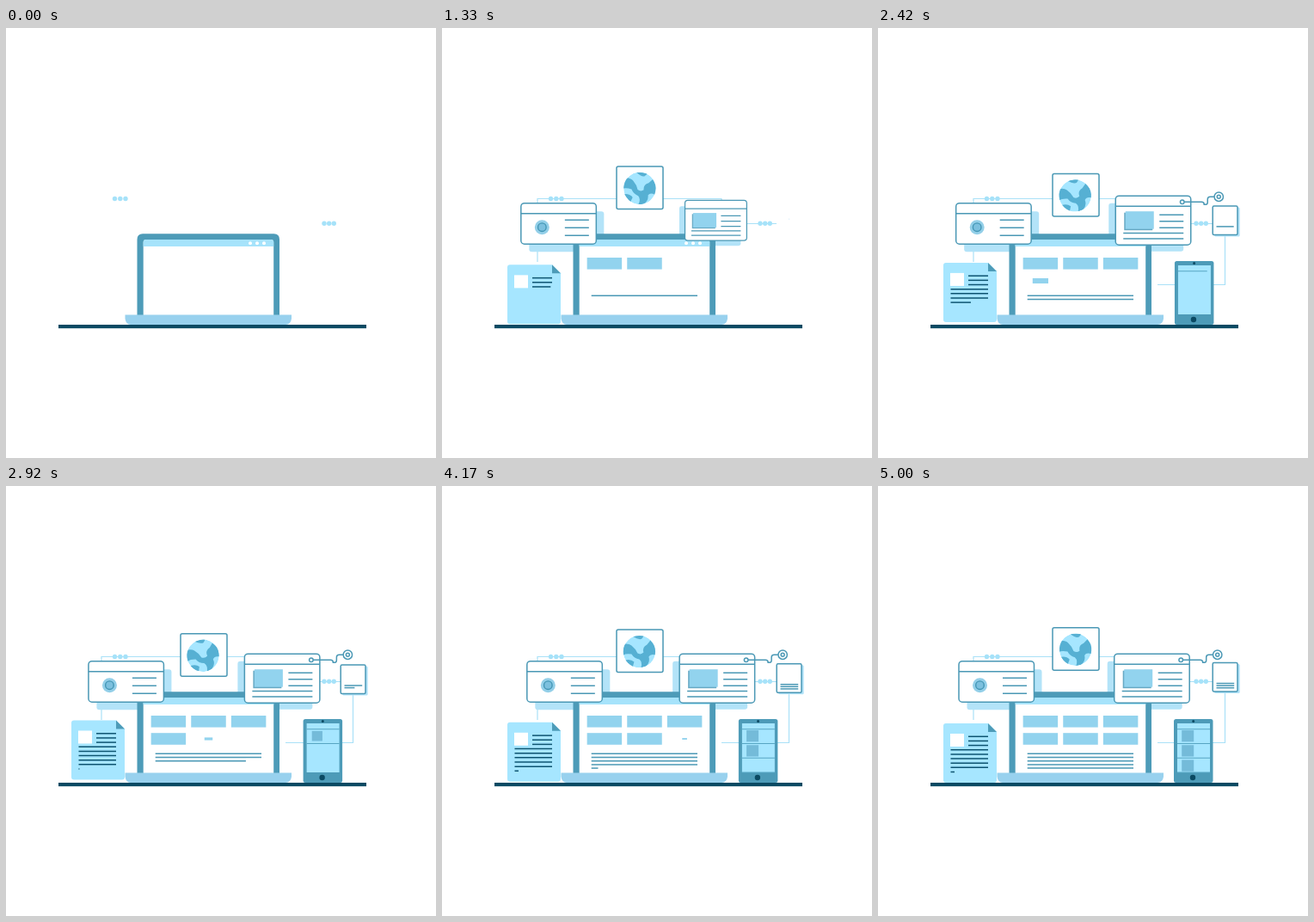
Recreate the animation shown at these times as an HTML page. Size 500x500 px, loop 5.08 s.

```html
<!DOCTYPE html>
<html lang="en">
<head>
<meta charset="utf-8">
<title>Connected devices</title>
<style>
  html, body { margin: 0; width: 100%; height: 100%; overflow: hidden; background: #fff; }
  svg { display: block; width: 100%; height: 100%; }
  .wire { fill: none; stroke: #a9e1f7; stroke-width: 1.2; }
  .card { fill: #fff; stroke: #4a98b5; stroke-width: 1.5; }
  .ink { fill: none; stroke: #4a98b5; stroke-width: 1.5; }
  .shade { fill: #b3e3f8; }
  .pale { fill: #a6e6ff; }
  .mid { fill: #92d3ee; }
  .steel { fill: #4d9bb8; }
  .navy { fill: #0b4a63; }
</style>
</head>
<body>
<svg viewBox="0 0 500 500" xmlns="http://www.w3.org/2000/svg">
  <defs><clipPath id="disc"><circle r="18.7"/></clipPath></defs>

  <path id="wireA" class="wire" pathLength="1" d="M111 272V198.5H325V227.5H389"/>
  <path id="wireB" class="wire" pathLength="1" d="M403.5 239V298.5H325"/>
  <g fill="#a6e2f9">
    <circle cx="126.5" cy="198.5" r="2.7"/><circle cx="132.8" cy="198.5" r="2.7"/><circle cx="139" cy="198.5" r="2.7"/>
    <circle cx="370" cy="227.3" r="2.7"/><circle cx="375.7" cy="227.3" r="2.7"/><circle cx="381.3" cy="227.3" r="2.7"/>
  </g>

  <g id="leftShade"><rect class="shade" x="9.5" y="9.5" width="87" height="47" rx="3"/></g>
  <g id="rightShade"><rect class="shade" x="-8" y="8.5" width="87" height="56" rx="3"/></g>

  <g id="laptop">
    <path class="steel" d="M152.5 335V246Q152.5 239.3 159 239.3H311.5Q318 239.3 318 246V335Z"/>
    <path fill="#fff" d="M159.7 335V249Q159.7 246 163 246H308Q311.2 246 311.2 249V335Z"/>
    <path fill="#a6e3fb" d="M159.7 254V249Q159.7 246 163 246H308Q311.2 246 311.2 249V254Z"/>
    <g fill="#fff"><circle cx="284" cy="250.2" r="2"/><circle cx="292" cy="250.2" r="2"/><circle cx="300" cy="250.2" r="2"/></g>
    <g id="tiles" class="mid"></g>
    <g id="text" class="ink"></g>
    <path fill="#98d1ee" d="M138.5 333.5H332V338Q331 345 325 345H145Q139.500 345 138.500 338Z"/>
  </g>

  <g id="doc">
    <path class="pale" d="M3 0H52L62 10V66Q62 69 59 69H3Q0 69 0 66V3Q0 0 3 0Z"/>
    <path class="steel" d="M52 0L62 10H52Z"/>
    <rect x="8" y="12" width="16" height="15" fill="#fff"/>
    <g id="docText" fill="none" stroke="#0d5470" stroke-width="1.5"></g>
  </g>

  <g id="left">
    <rect class="card" width="87.5" height="47.5" rx="4"/>
    <path class="ink" d="M0 12H87.5" stroke-width="1.2"/>
    <circle cx="24.5" cy="28" r="8.5" fill="#93cfe8"/>
    <circle cx="24.5" cy="28" r="4.8" fill="#7cc0de" stroke="#4396b5" stroke-width="1.4"/>
    <path class="ink" d="M51 19.500H79M51 28.500H79M51 37.500H79"/>
  </g>

  <g id="globe">
    <rect class="card" x="-27" y="-25.500" width="54" height="49.500" rx="2"/>
    <g id="earth" clip-path="url(#disc)">
      <circle class="pale" r="18.700"/>
      <g fill="#56b0d3">
        <path d="M-19 -9Q-12 -10 -9 -7Q-4 -3 -2 2Q2 4 5 1Q3 -5 9 -8L13 -13L19 -6V4Q13 2 11 6Q13 12 8 17L2 19Q4 12 0 9Q-6 8 -9 3Q-15 2 -19 4Z"/>
        <path d="M-8 -18Q0 -13 3 -15L6 -19Z"/>
        <path d="M-17 10Q-10 8 -6 12L-8 19Z"/>
      </g>
    </g>
  </g>

  <g id="phone">
    <rect class="steel" y="-74" width="45.500" height="74" rx="2.500"/>
    <rect class="pale" x="4" y="-69" width="38" height="57"/>
    <circle class="navy" cx="22.700" cy="-71.500" r="1.500"/>
    <circle class="navy" cx="22" cy="-6" r="3.200"/>
    <g id="rows" fill="none" stroke="#56a5c2" stroke-width="1.100"></g>
    <g id="thumbs" fill="#74bbd9"></g>
  </g>

  <g id="note">
    <rect class="shade" x="2" y="1.500" width="29.500" height="34" rx="1.500"/>
    <rect class="card" width="28.800" height="33.500" rx="1.500" stroke-width="1.200"/>
    <g id="noteText" class="ink"></g>
  </g>

  <g id="right">
    <rect class="card" width="87.500" height="57" rx="4"/>
    <path class="ink" d="M0 12H87.500" stroke-width="1.200"/>
    <rect x="10" y="19.500" width="33" height="20.500" fill="#67a9c4"/>
    <rect class="mid" x="11.500" y="18" width="33" height="20.500"/>
    <path class="ink" d="M51 22H79M51 29.500H79M51 37H79M9 43.300H79M9 49.800H79"/>
  </g>
  <g id="cord" class="ink">
    <circle id="plug" cx="77.500" cy="7" r="2.300" fill="#fff"/>
    <path id="lead" pathLength="1" d="M80 7H100Q103 7 103 10H105Q107 10 107 7V4Q107 1 110 1H115"/>
    <circle id="ring" cx="120" cy="1" r="5.200" pathLength="1"/>
    <circle id="core" cx="120" cy="1" r="2"/>
  </g>

  <rect class="navy" x="61" y="345" width="358" height="4.200"/>
</svg>
<script>
const LOOP = 5080, FPS = 12;
const $ = id => document.getElementById(id);
const clamp = v => Math.max(0, Math.min(1, v));
const span = (t, start, len) => clamp((t - start) / len);
const ease = p => (1 - Math.cos(Math.PI * p)) / 2;
const out = p => 1 - (1 - p) ** 3;

function add(parent, tag, attrs) {
  const el = document.createElementNS('http://www.w3.org/2000/svg', tag);
  for (const k in attrs) el.setAttribute(k, attrs[k]);
  return $(parent).appendChild(el);
}

// Eased value through [time, value] keys
function sway(t, keys) {
  for (let i = 1; i < keys.length; i++) {
    const [a, u] = keys[i - 1], [b, v] = keys[i];
    if (t <= b) return u + (v - u) * ease(span(t, a, b - a));
  }
  return keys[keys.length - 1][1];
}

// Items are [start, length] tweens bound to a shape
const lines = [], pops = [];
function line(parent, x, x2, y, start, len) {
  lines.push({ el: add(parent, 'path', {}), x, x2, y, start, len });
}
function pop(parent, cx, cy, w, h, start, len) {
  pops.push({ el: add(parent, 'rect', {}), cx, cy, w, h, start, len });
}

[250, 950, 1650, 2250, 2830, 4115].forEach((s, i) =>
  pop('tiles', 188.9 + 46.6 * (i % 3), 273.8 + 20.2 * (i / 3 | 0), 40.5, 13.6, s, 370));
[435, 1490, 2490, 3375, 4135].forEach((s, i) =>
  line('text', 173.7, 297, 311.3 + 4.2 * i, s, 500));
for (let i = 0; i < 9; i++)
  line('docText', i < 3 ? 29 : 8.5, i < 8 ? 52 : 13, 15.3 + 5.15 * i, 455 + 300 * i, 300);
[1880, 2600, 3250].forEach((s, i) =>
  line('noteText', 4.3, 25, 24 + 2.6 * i, s, 550));
[2150, 2500, 3300, 3450].forEach((s, i) =>
  line('rows', 4, 42, -62.3 + 16.8 * i, s, 300));
[2620, 3470, 4330].forEach((s, i) =>
  pop('thumbs', 16.2, -54.3 + 17.2 * i, 14, 13.3, s, 340));

function place(id, x, y, sx = 1, sy = sx, cx = 0, cy = 0) {
  const el = $(id);
  el.style.display = sx > 0 && sy > 0 ? '' : 'none';
  el.setAttribute('transform',
    `translate(${x + cx} ${y + cy}) scale(${sx} ${sy}) translate(${-cx} ${-cy})`);
}
function trace(id, p) {
  $(id).style.display = p > 0 ? '' : 'none';
  $(id).setAttribute('stroke-dasharray', p < 1 ? `${p} 2` : 'none');
}

function draw(t) {
  trace('wireA', span(t, 80, 744));
  trace('wireB', span(t, 1550, 330));

  const docY = sway(t, [[700, 276], [2900, 272.5], [5000, 276]]);
  place('doc', 76, docY, 1, out(span(t, 80, 450)), 0, 69);

  const leftX = sway(t, [[700, 94], [2050, 89.2], [3650, 101.1], [5000, 94]]);
  const leftPop = out(span(t, 160, 420));
  place('left', leftX, 203.7, leftPop, leftPop, 43.7, 23.7);
  place('leftShade', leftX, 203.7, leftPop, leftPop, 43.7, 23.7);

  const globeY = sway(t, [[1000, 165], [1400, 160.6], [2150, 168.5], [2900, 171.7], [5000, 164.7]]);
  place('globe', 230, globeY + 25.5, out(span(t, 800, 400)));
  const lean = (globeY - 167) / 5;
  $('earth').setAttribute('transform', `translate(${-0.6 - 0.4 * lean}) rotate(${-9 * lean})`);

  const shift = sway(t, [[1500, 0], [3300, 3], [5000, 0]]);
  const rightPop = out(span(t, 1150, 420));
  place('right', 274.7 + shift, 195.2, rightPop, rightPop, 43.7, 28.5);
  place('rightShade', 274.7 + shift, 195.2, rightPop, rightPop, 43.7, 28.5);
  place('cord', 274.7 + shift, 195.2);
  trace('lead', span(t, 1750, 420));
  trace('ring', span(t, 1830, 350));
  $('plug').style.display = t > 1950 ? '' : 'none';
  $('core').style.display = t > 2080 ? '' : 'none';

  place('phone', 344 + shift * 0.6, 345, 1, ease(span(t, 1690, 420)));

  const noteY = sway(t, [[1600, 205.5], [3200, 208.2], [5000, 205.5]]);
  const notePop = out(span(t, 1330, 380));
  place('note', 389.2, noteY, notePop, notePop, 14.4, 16.7);

  for (const l of lines) {
    const p = span(t, l.start, l.len);
    l.el.setAttribute('d', p ? `M${l.x} ${l.y}H${l.x + (l.x2 - l.x) * p}` : '');
  }
  for (const r of pops) {
    const p = span(t, r.start, r.len), w = r.w * p, h = r.h * p;
    r.el.setAttribute('x', r.cx - w / 2);
    r.el.setAttribute('y', r.cy - h / 2);
    r.el.setAttribute('width', w);
    r.el.setAttribute('height', h);
  }
}

const began = performance.now();
function tick() {
  const t = (performance.now() - began) % LOOP;
  draw(Math.floor((t + 4) * FPS / 1000) * 1000 / FPS);
  requestAnimationFrame(tick);
}
tick();
</script>
</body>
</html>
```
